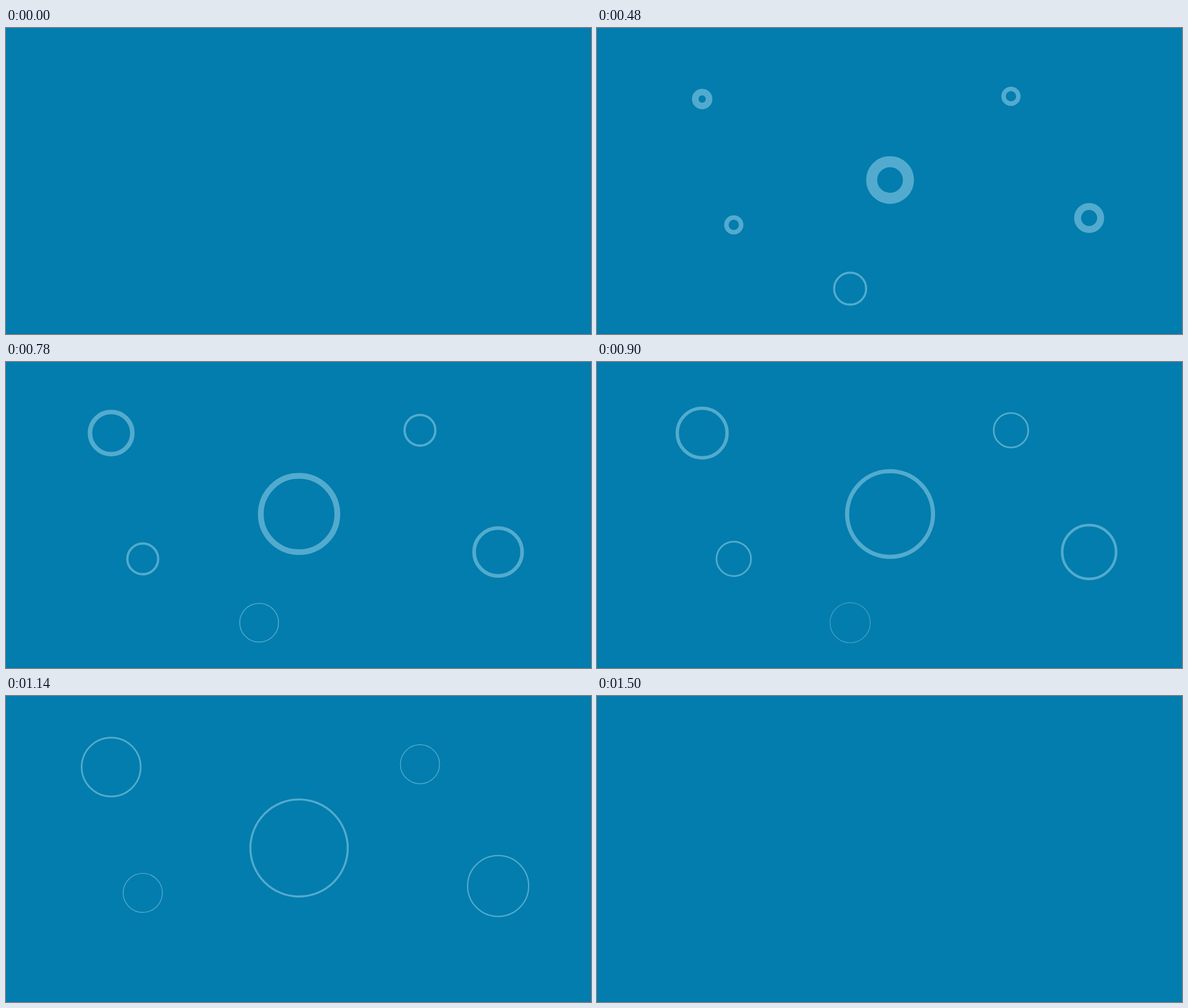
Write an HTML page that moves like this. It is 1033 px wide and 542 px high and loops after 1650 ms.

```html
<!DOCTYPE html>
<html lang="en">
<head>
<meta charset="utf-8">
<title>Ripples</title>
<style>
  html, body { margin: 0; width: 100%; height: 100%; overflow: hidden; background: #037dad; }
  svg { display: block; width: 1033px; height: 542px; }
  circle { fill: none; stroke: #52abce; }
</style>
</head>
<body>
<svg id="stage" viewBox="0 0 1033 542">
  <rect y="540.5" width="1033" height="1.5" fill="#0378a6"/>
</svg>
<script>
const LOOP = 1650, STEP = 30, GROW = 1380, HOLE_DELAY = 127, FIRST = 120;
const BIG = 91.5, MID = 57.4, SMALL = 36.8;

// Centre, final radius, start of growth and moment of disappearance (ms)
const rings = [
  { x: 517.5, y: 269.2, radius: BIG, start: 120, end: 1500 },
  { x: 731, y: 120.9, radius: SMALL, start: 120, end: 1500 },
  { x: 869, y: 336.5, radius: MID, start: 120, end: 1170 },
  { x: 241.5, y: 348.7, radius: SMALL, start: 120, end: 1230 },
  { x: 185.7, y: 125.8, radius: MID, start: 208, end: 1260 },
  { x: 447, y: 461.7, radius: SMALL, start: -215, end: 1110 }
];

const stage = document.getElementById('stage');
for (const ring of rings) {
  ring.el = document.createElementNS('http://www.w3.org/2000/svg', 'circle');
  ring.el.setAttribute('cx', ring.x);
  ring.el.setAttribute('cy', ring.y);
  stage.append(ring.el);
}

const bezier = (s, a, b) => 3 * a * s * (1 - s) ** 2 + 3 * b * s * s * (1 - s) + s ** 3;

function ease(p) {
  if (p <= 0) return 0;
  if (p >= 1) return 1;
  let low = 0, high = 1;
  for (let i = 0; i < 24; i++) {
    const mid = (low + high) / 2;
    if (bezier(mid, 0.237, 0.225) < p) low = mid; else high = mid;
  }
  return bezier(low, 0.1, 1);
}

function draw(now) {
  const t = Math.floor((now % LOOP) / STEP + 0.01) * STEP;
  for (const { el, radius, start, end } of rings) {
    const outer = radius * ease((t - start) / GROW);
    const inner = radius * ease((t - start - HOLE_DELAY) / GROW);
    const visible = t >= FIRST && t < end && outer > 0;
    el.setAttribute('visibility', visible ? 'visible' : 'hidden');
    el.setAttribute('r', (outer + inner) / 2);
    el.setAttribute('stroke-width', outer - inner);
  }
  requestAnimationFrame(draw);
}

draw(performance.now());
</script>
</body>
</html>
```
